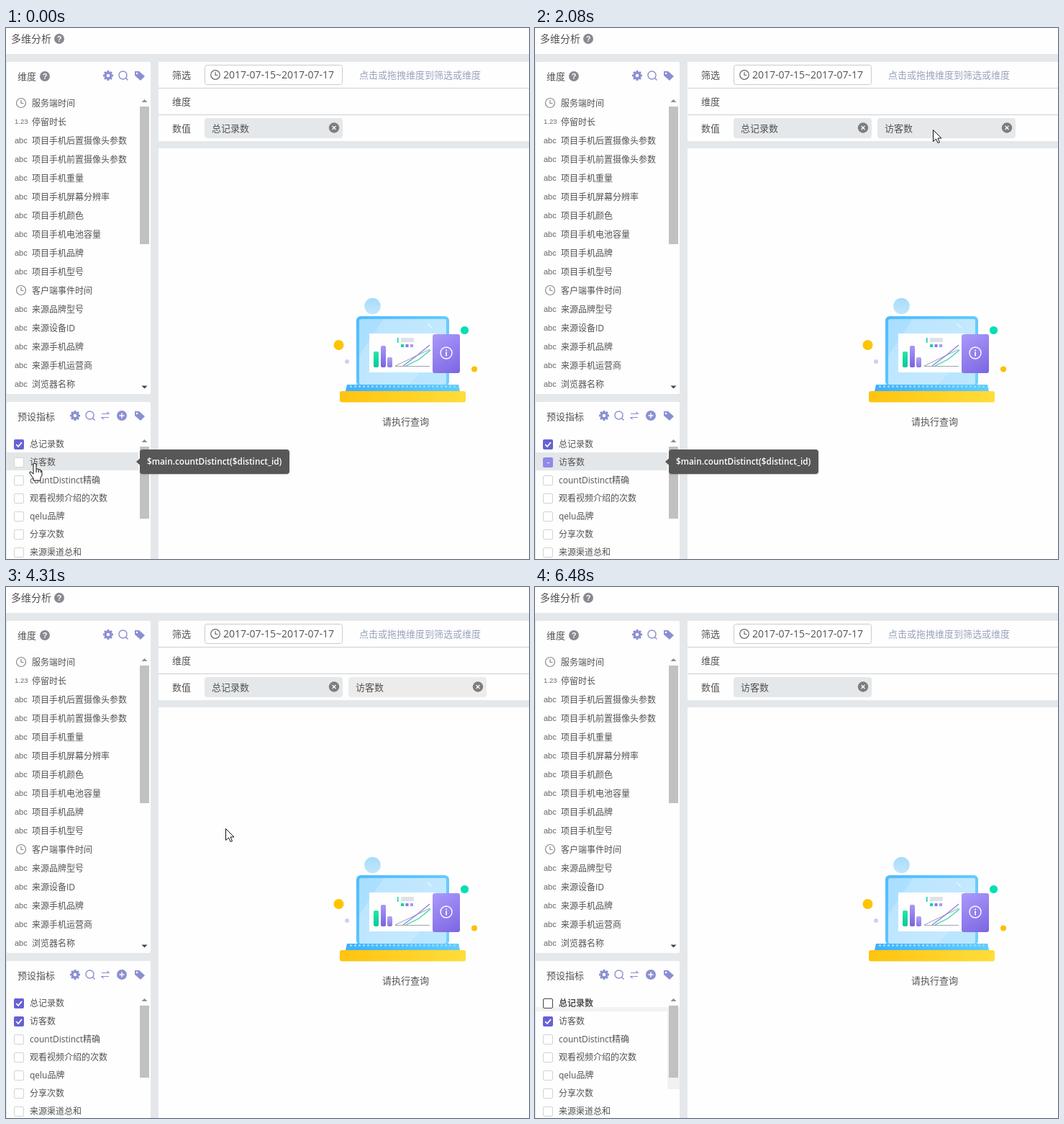
An HTML page with a canvas that plays this animation: 727x737 px, repeating every 6600 ms.

```html
<!DOCTYPE html>
<html lang="zh-CN">
<head>
<meta charset="utf-8">
<title>多维分析</title>
<style>
html, body { margin: 0; width: 100%; height: 100%; overflow: hidden; background: #e4e8eb; }
canvas { display: block; width: 727px; height: 737px; }
</style>
</head>
<body>
<canvas id="stage" width="727" height="737"></canvas>
<script>
const g = document.getElementById('stage').getContext('2d');
const LOOP = 6600;
const SANS = '"Open Sans", "Noto Sans CJK SC", "Noto Sans CJK", sans-serif';
const ARIAL = '"Liberation Sans", sans-serif';
const INK = '#525252', PURPLE = '#8b8fd2', PAPER = '#fefefe', GREY = '#8b8890';

const dimensions = ['服务端时间', '停留时长', '项目手机后置摄像头参数', '项目手机前置摄像头参数',
  '项目手机重量', '项目手机屏幕分辨率', '项目手机颜色', '项目手机电池容量', '项目手机品牌',
  '项目手机型号', '客户端事件时间', '来源品牌型号', '来源设备ID', '来源手机品牌',
  '来源手机运营商', '浏览器名称'];
const metrics = ['总记录数', '访客数', 'countDistinct精确', '观看视频介绍的次数', 'qelu品牌',
  '分享次数', '来源渠道总和'];
const FORMULA = '$main.countDistinct($distinct_id)';

// [start, kind, x, y]: each pose holds until the next one
const pointer = [
  [0, 'hand', 40, 604], [1050, 'drag', 80, 566], [1180, 'drag', 232, 424], [1300, 'drag', 402, 296],
  [1420, 'drag', 517, 224], [1540, 'drag', 553, 121], [1660, 'drop', 562, 143],
  [1930, 'arrow', 553, 141], [2630, 'arrow', 554, 141], [4310, 'arrow', 305, 335],
  [4460, 'arrow', 206, 440], [4580, 'arrow', 95, 545], [4700, 'hand', 33, 596],
  [4850, 'hand', 26, 588], [5000, 'hand', 20, 576], [5830, 'hand', 34, 578],
  [5960, 'hand', 64, 583], [6110, 'arrow', 215, 610], [6230, 'arrow', 440, 655],
  [6360, 'arrow', 680, 712], [6480, 'none', 0, 0]];
const menuScale = [[0, 0], [2930, 0.35], [3060, 0.8], [3180, 1], [3580, 0.84], [3730, 0.4], [3880, 0]];

const at = (keys, t) => keys.filter(k => k[0] <= t).pop();
const within = (t, a, b) => t >= a && t < b;

function rect(x, y, w, h, color) {
  g.fillStyle = color;
  g.fillRect(x, y, w, h);
}
function box(x, y, w, h, r, fill, stroke) {
  g.beginPath();
  g.roundRect(x, y, w, h, r);
  if (fill) { g.fillStyle = fill; g.fill(); }
  if (stroke) { g.strokeStyle = stroke; g.lineWidth = 1; g.stroke(); }
}
function disc(x, y, r, color) {
  g.fillStyle = color;
  g.beginPath();
  g.arc(x, y, r, 0, 7);
  g.fill();
}
function ring(x, y, r, color, width = 1.2) {
  g.strokeStyle = color;
  g.lineWidth = width;
  g.beginPath();
  g.arc(x, y, r, 0, 7);
  g.stroke();
}
function line(points, color, width = 1) {
  g.strokeStyle = color;
  g.lineWidth = width;
  g.beginPath();
  for (let i = 0; i < points.length; i += 2) g.lineTo(points[i], points[i + 1]);
  g.stroke();
}
function poly(points, fill, stroke) {
  g.beginPath();
  for (let i = 0; i < points.length; i += 2) g.lineTo(points[i], points[i + 1]);
  g.closePath();
  g.fillStyle = fill;
  g.fill();
  if (stroke) { g.strokeStyle = stroke; g.lineWidth = 1; g.stroke(); }
}
function text(s, x, mid, size = 12, color = INK, weight = 400, family = SANS) {
  g.font = `${weight} ${size}px ${family}`;
  g.fillStyle = color;
  g.fillText(s, x, Math.round(mid + size * 0.36));
}
function gradient(x0, y0, x1, y1, from, to) {
  const fill = g.createLinearGradient(x0, y0, x1, y1);
  fill.addColorStop(0, from);
  fill.addColorStop(1, to);
  return fill;
}
function shadow(color, blur, y) {
  g.shadowColor = color;
  g.shadowBlur = blur;
  g.shadowOffsetY = y;
}
const noShadow = () => shadow('transparent', 0, 0);

function help(x, y) {
  disc(x, y, 7, GREY);
  g.textAlign = 'center';
  text('?', x, y, 11, '#fff', 700, ARIAL);
  g.textAlign = 'left';
}
function clock(x, y, r, color) {
  ring(x, y, r, color);
  line([x, y - r * 0.6, x, y + 0.5, x + r * 0.55, y + 0.5], color, 1.2);
}
function gear(x, y) {
  for (let i = 0; i < 4; i++) {
    const dx = 7 * Math.cos(i * Math.PI / 4), dy = 7 * Math.sin(i * Math.PI / 4);
    line([x - dx, y - dy, x + dx, y + dy], PURPLE, 3);
  }
  disc(x, y, 5.4, PURPLE);
  disc(x, y, 2.3, PAPER);
}
function search(x, y) {
  ring(x - 0.5, y - 0.5, 5.5, PURPLE, 1.4);
  line([x + 3.5, y + 3.5, x + 6.5, y + 6.5], PURPLE, 1.5);
}
function tag(x, y) {
  poly([x - 7, y - 6, x - 1, y - 6, x + 7, y + 1, x + 1, y + 7, x - 7, y], PURPLE);
  disc(x - 4, y - 3, 1.3, PAPER);
}
function swap(x, y) {
  line([x - 5, y - 2.5, x + 5, y - 2.5, x + 2.5, y - 5], PURPLE, 1.2);
  line([x + 5, y + 2.5, x - 5, y + 2.5, x - 2.5, y + 5], PURPLE, 1.2);
}
function plus(x, y) {
  disc(x, y, 7, PURPLE);
  line([x - 3.5, y, x + 3.5, y], '#fff', 1.5);
  line([x, y - 3.5, x, y + 3.5], '#fff', 1.5);
}
function triangle(x, y, dir, color) {
  poly([x - 4, y + 2 * dir, x + 4, y + 2 * dir, x, y - 2 * dir], color);
}

function checkbox(y, state) {
  if (state === 'on' || state === 'half') {
    box(11, y - 7, 14, 14, 2, state === 'on' ? '#6661d6' : '#9189e8');
    if (state === 'on') line([14.2, y, 17, y + 3, 22, y - 2.8], '#fff', 1.8);
    else rect(17, y, 3, 1, '#fff');
  } else {
    box(11.5, y - 6.5, 13, 13, 1.5, '#fff', state === 'dark' ? '#454545' : '#d3d3d3');
  }
}

function dimensionPanel(t) {
  box(1, 47, 200, 461, 2, PAPER);
  text('维度', 16, 67, 13);
  help(54, 67);
  gear(142, 66);
  search(163, 66);
  tag(186, 66);
  dimensions.forEach((name, i) => {
    const y = 105 + 26 * i;
    if (i % 10 === 0) clock(21, y - 1, 6.5, GREY);
    else if (i === 1) text('1.23', 12, y - 1, 9.5, '#666', 400, ARIAL);
    else text('abc', 12, y - 1, 11, '#666', 400, ARIAL);
    text(name, 36, y);
  });
  if (within(t, 1050, 2080)) rect(184, 476, 17, 32, '#f1f1f1');
  if (within(t, 4460, 5680)) rect(184, 335, 17, 173, '#f1f1f1');
  triangle(192.5, 101, 1, '#8f8f8f');
  rect(186, 109, 13, 191, '#c1c1c1');
  triangle(192.5, 498.5, -1, '#444');
}

function metricPanel(t) {
  box(1, 519, 200, 230, 2, PAPER);
  text('预设指标', 16, 539, 13);
  gear(96, 538);
  search(117, 538);
  swap(138, 538);
  plus(161, 538);
  tag(186, 538);
  if (within(t, 1050, 2080)) {
    rect(68, 559, 133, 1, '#ececec');
    rect(184, 564, 17, 64, '#f1f1f1');
  }
  if (within(t, 4700, 5680)) {
    rect(1, 559, 200, 1, '#ececec');
    rect(184, 564, 17, 18, '#f1f1f1');
  }
  if (t >= 5960) {
    rect(1, 583, 183, 6, '#f3f3f3');
    rect(184, 583, 17, 114, '#f1f1f1');
  }
  if (t < 2230) rect(1, 589, 183, 25, within(t, 120, 2080) ? '#e0e0e0' : '#e4e7e9');
  if (within(t, 4700, 5000)) rect(1, 589, 183, 25, '#e4e7e9');
  if (within(t, 5000, 5680)) {
    rect(1, 564, 183, 25, '#e4e4e4');
    rect(1, 589, 183, 25, '#f9f9f9');
  }
  const total = t < 5680 ? 'on' : t < 5830 ? 'half' : 'dark';
  const visitors = t < 2080 ? 'off' : t < 2350 ? 'half' : 'on';
  metrics.forEach((name, i) => {
    const y = 578 + 25 * i;
    checkbox(y, [total, visitors][i] || 'off');
    text(name, 33, y - 0.5, 12, INK, i === 0 && t >= 5830 ? 700 : 400);
  });
  triangle(192.5, 573, 1, '#8f8f8f');
  rect(186, 581, 13, 100, '#c1c1c1');
}

function chip(name, x, color) {
  box(x, 125, 192, 28, 4, color);
  text(name, x + 10, 139, 13);
  const cx = x + 180, cy = 138.5;
  disc(cx, cy, 7.2, '#7d7d7d');
  line([cx - 2.5, cy - 2.5, cx + 2.5, cy + 2.5], '#fff', 1.3);
  line([cx + 2.5, cy - 2.5, cx - 2.5, cy + 2.5], '#fff', 1.3);
}

function queryPanel(t) {
  rect(212, 47, 515, 110, PAPER);
  rect(212, 83, 515, 1, '#cfcfcf');
  rect(212, 120, 515, 1, '#cfcfcf');
  ['筛选', '维度', '数值'].forEach((s, i) => text(s, 231, 65 + 37 * i, 13));
  box(276.5, 51.5, 191, 27, 3, '#fff', '#cbcbcb');
  clock(291, 65, 6.3, '#666');
  text('2017-07-15~2017-07-17', 302, 65, 14);
  text('点击或拖拽维度到筛选或维度', 491, 65, 13, '#9aa3bd');
  if (t < 5680) {
    chip('总记录数', 276, '#e4e8ea');
    if (t >= 2080) chip('访客数', 476, t < 2230 ? '#e6e8ea' : t < 3730 ? '#d9d9d9' : '#ececec');
  } else {
    chip('访客数', 276, '#e4e8ea');
  }
}

function illustration() {
  disc(509.5, 386, 11.3, gradient(510, 375, 510, 397, '#a6dcfb', '#c3e6fc'));
  disc(462.5, 440, 7, '#ffc400');
  disc(474, 463, 3, '#d3cdf6');
  disc(637.5, 419.5, 5.6, '#00dfb5');
  disc(651, 473.5, 4, '#ffbf00');

  box(487, 400, 129, 97, 6, gradient(487, 400, 616, 497, '#50bbfc', '#74d1fe'));
  box(491, 404, 121, 91, 3, gradient(492, 405, 611, 495, '#a9deff', '#bde7ff'));
  poly([525, 404, 612, 404, 612, 440, 560, 495, 491, 495, 491, 455], 'rgba(255,255,255,.18)');
  line([586, 410, 592, 416], '#e9f8ff', 1.2);
  rect(505, 424, 93, 54, PAPER);

  box(511, 449, 7, 22, 2, gradient(0, 449, 0, 471, '#2be6a5', '#00c99b'));
  box(521, 441, 7, 30, 2, gradient(0, 441, 0, 471, '#a897fb', '#7b62de'));
  box(530, 457, 7, 14, 2, gradient(0, 457, 0, 471, '#b3a6f7', '#8a77e2'));
  rect(544, 430, 1.5, 7, '#00d8a0');
  rect(549, 430, 18, 6, '#dde3e6');
  ['#00d8a0', '#8c78e8', '#a897fb'].forEach((c, i) => rect(549 + 6.5 * i, 439, 4, 4, c));
  line([541, 469.5, 589, 469.5], '#9aa6ad');
  line([541, 469, 562, 459, 589, 446], '#8fa2ad');
  line([552, 469, 572, 454, 589, 440], '#8c78e8', 1.2);
  line([556, 469, 574, 460, 590, 447], '#2cd6a2', 1.2);

  poly([474, 495, 629, 495, 631, 504, 472, 504], gradient(472, 0, 631, 0, '#3fb1fb', '#62ccfd'));
  for (let x = 478; x < 626; x += 6) rect(x, 496, 3, 3, '#8bd8fd');
  box(464, 504, 175, 15.5, 3, gradient(464, 504, 639, 504, '#ffc30f', '#ffdd3a'));

  box(593, 425, 38, 54, 3, gradient(593, 425, 625, 479, '#ab9afb', '#7e68e3'));
  ring(612, 451, 8, '#fff', 1.4);
  rect(611.2, 446.5, 1.7, 1.8, '#fff');
  rect(611.2, 449.5, 1.7, 6, '#fff');
  text('请执行查询', 523, 546, 13);
}

function sideTip() {
  shadow('rgba(0,0,0,.15)', 2, 1);
  box(186, 585, 208, 34, 4, '#575757');
  noShadow();
  poly([181, 602, 186.5, 597, 186.5, 607], '#575757');
  text(FORMULA, 196, 602, 11.8, '#fff', 600);
}

function topTip() {
  g.globalAlpha = 0.6;
  box(468, 61, 208, 52, 4, '#575757');
  poly([566, 113, 578, 113, 572, 119], '#575757');
  text('访客数', 478, 78, 12, '#fff', 600);
  text(FORMULA, 478, 96, 11.8, '#fff', 600);
  g.globalAlpha = 1;
}

function menu(scale) {
  if (!scale) return;
  g.save();
  g.globalAlpha = scale;
  g.translate(0, 157);
  g.scale(1, scale);
  shadow('rgba(0,0,0,.28)', 4, 1);
  box(476, 0, 192, 64, 3, PAPER);
  noShadow();
  ['排序', '高级计算'].forEach((s, i) => {
    const y = 16 + 32 * i;
    text(s, 491.5, y + 0.5);
    line([647.5, y - 5, 652, y - 0.5, 647.5, y + 4], '#909090');
  });
  g.restore();
}

function ghost(x, y) {
  rect(x, y, 163, 20, '#e9e9e9');
  box(x + 1, y + 4, 13, 13, 1, '#fff');
  text('访客数', x + 22, y + 10.5, 12, '#9a9a9a');
}
function forbid(x, y) {
  ring(x, y, 8, '#fff', 4.5);
  ring(x, y, 8, '#000', 2.2);
  line([x - 5.5, y - 5.5, x + 5.5, y + 5.5], '#000', 2.2);
}
function arrow(x, y) {
  g.save();
  g.translate(x + 0.5, y + 0.5);
  poly([0, 0, 0, 16, 4, 12.5, 6.5, 18, 9, 17, 6.5, 11.5, 11.5, 11.5], '#fff', '#111');
  g.restore();
}
function hand(x, y) {
  g.save();
  g.translate(x, y);
  poly([-2, 1, 0, 0, 2, 1, 2, 8, 5, 8, 5.5, 9, 8, 9, 8.5, 10, 10, 11, 10, 17, 8, 20, 8, 24,
    -2, 24, -2, 21, -7, 14, -7, 12, -5, 12, -2, 15], '#fff', '#111');
  line([2, 8, 2, 13], '#111');
  line([5.5, 9, 5.5, 13], '#111');
  line([8.5, 10, 8.5, 13], '#111');
  g.restore();
}
function drawPointer([, kind, x, y]) {
  if (kind === 'drag' || kind === 'drop') ghost(x - 35, y + 3);
  if (kind === 'drag') forbid(x, y);
  if (kind === 'drop') arrow(553, 141);
  if (kind === 'arrow') arrow(x, y);
  if (kind === 'hand') hand(x, y);
}

function draw(t) {
  rect(0, 0, 727, 737, '#e4e8eb');
  rect(0, 0, 727, 36, PAPER);
  text('多维分析', 7, 15, 14);
  help(74, 15);
  dimensionPanel(t);
  metricPanel(t);
  queryPanel(t);
  rect(212, 167, 515, 570, PAPER);
  illustration();
  if (t < 2230) sideTip();
  menu(at(menuScale, t)[1]);
  if (within(t, 3580, 3730)) topTip();
  drawPointer(at(pointer, t));
}

const start = performance.now();
function tick() {
  draw((performance.now() - start) % LOOP);
  requestAnimationFrame(tick);
}
tick();
</script>
</body>
</html>
```
